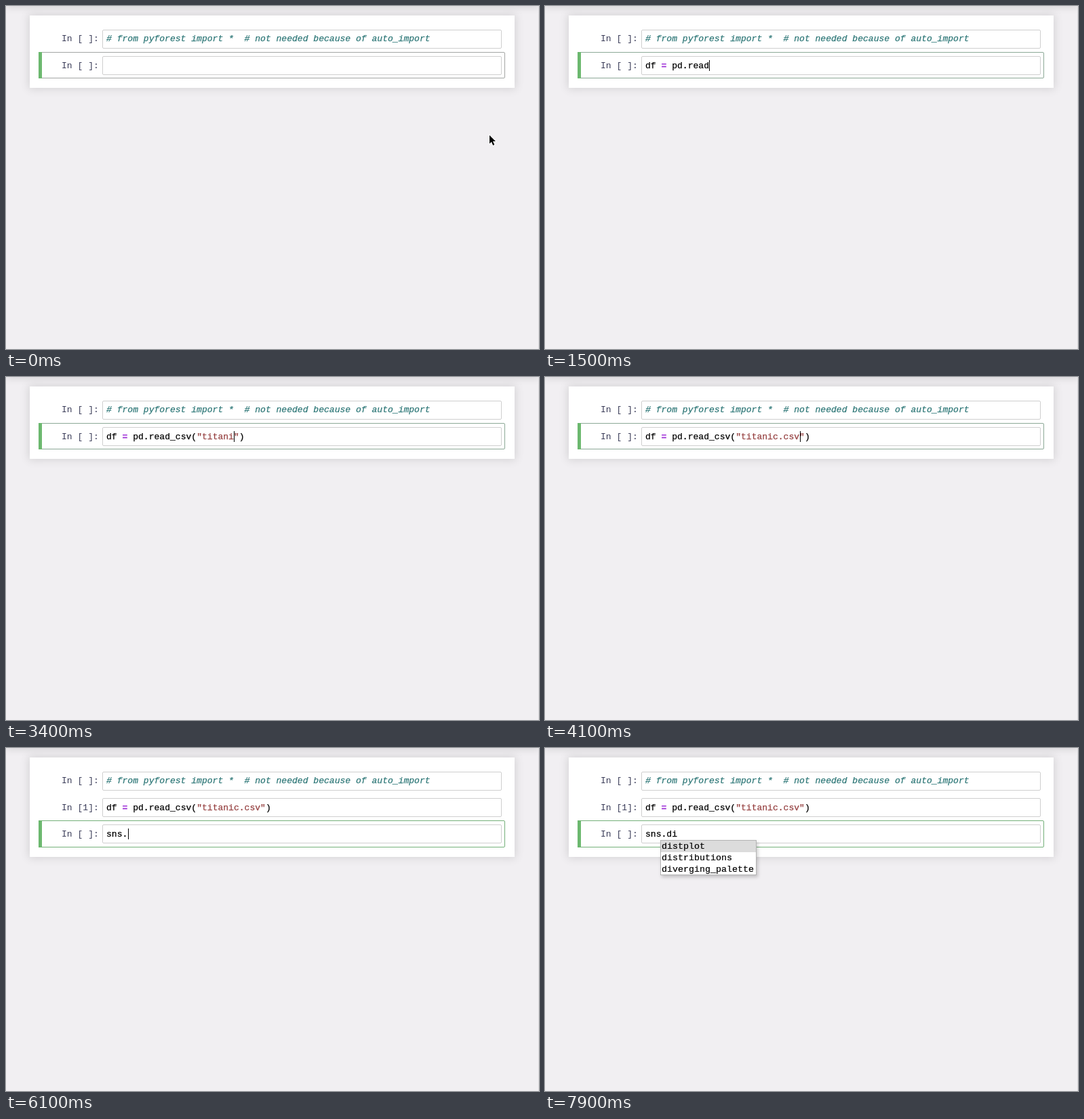
These frames come from a looping animation (786x507 px, 8000 ms). An HTML page:

```html
<!DOCTYPE html>
<html lang="en">
<head>
<meta charset="utf-8">
<title>Notebook typing</title>
<style>
  html, body { margin: 0; width: 100%; height: 100%; overflow: hidden; }
  body { position: relative; background: #f1eff2; font: 13.05px/29px "Liberation Mono", "Courier New", monospace; }
  body * { position: absolute; box-sizing: border-box; white-space: pre; }
  #header { left: 0; top: -10px; width: 100%; height: 10px; }
  #edge { right: 0; top: 0; width: 1px; height: 100%; background: #dddbde; }
  #page { left: 35px; top: 14px; width: 715px; background: #fff; }
  #header, #page { box-shadow: 0 0 12px 1px rgba(87, 87, 87, .2); }
  #active { left: 48px; width: 688px; height: 39.3px; border: 1px solid; border-radius: 2px; }
  #active::before { content: ""; position: absolute; left: -1px; top: -1px; bottom: -1px; width: 5px; background: #6cb86f; }
  .cell { left: 0; width: 731px; height: 28.3px; }
  .label, .code { top: -.2px; }
  .label { left: 82px; color: #3a3c58; }
  .input { left: 142px; width: 589px; height: 28.3px; border: 1px solid #cfcfcf; border-radius: 2px; }
  .code { left: 148px; color: #000; -webkit-text-stroke: .25px; }
  .code * { position: static; }
  .comment { color: #2f7878; font-style: italic; }
  .op { color: #a035d8; font-weight: bold; }
  .str { color: #964242; }
  #caret { width: 1px; height: 16px; background: #000; }
  #popup { left: 170px; top: 136px; width: 142px; height: 52px; border: 1px solid #b4b4b4; background: #fff;
    box-shadow: 2px 3px 5px rgba(0, 0, 0, .2); font-size: 13.33px; line-height: 17px; -webkit-text-stroke: .2px; }
  #popup div { left: 0; width: 140px; height: 17px; padding-left: 1px; }
  #popup div:first-child { background: #dcdcdc; }
  #mouse { left: 711px; top: 189px; }
</style>
</head>
<body>
<div id="header"></div>
<div id="edge"></div>
<div id="page"></div>
<div id="active"></div>
<div id="caret"></div>
<div id="popup"></div>
<svg id="mouse" width="14" height="20"><path d="M2 2V14.5L4.9 11.8L7.2 17L9.3 16.1L7 11H11Z" fill="#000" stroke="#fff" stroke-width="1.6" paint-order="stroke"/></svg>
<script>
const LOOP = 8000, PITCH = 7.83, ROW = 39.3;
const RUN = 4600, DONE = 5000, POPUP = 7300;
const $ = id => document.getElementById(id);

function add(parent, cls, text = "") {
  const el = document.createElement("div");
  el.className = cls;
  el.textContent = text;
  return parent.appendChild(el);
}

const cells = [0, 1, 2].map(i => {
  const box = add(document.body, "cell");
  box.style.top = 34.6 + ROW * i + "px";
  add(box, "input");
  return { box, label: add(box, "label", "In [ ]:"), code: add(box, "code") };
});
cells[0].code.textContent = "# from pyforest import *  # not needed because of auto_import";
cells[0].code.classList.add("comment");
["distplot", "distributions", "diverging_palette"].forEach((word, i) => {
  add($("popup"), "", word).style.top = 17 * i + "px";
});
document.body.append($("caret"), $("popup"));

// Key times: even spacing between [time, characters typed] marks.
function keyTimes(marks) {
  const times = [marks[0][0]];
  for (let m = 1; m < marks.length; m++) {
    const [t0, n0] = marks[m - 1], [t1, n1] = marks[m];
    for (let n = n0 + 1; n <= n1; n++) times.push(t0 + (t1 - t0) * (n - n0) / (n1 - n0));
  }
  return times;
}

const lines = [
  { text: 'df = pd.read_csv("titanic.csv', keys: keyTimes([[200, 1], [1410, 12], [2720, 20], [4040, 29]]) },
  { text: "sns.di", keys: keyTimes([[5300, 1], [5950, 4], [6450, 5], [6700, 6]]) }
];

const highlight = s => s.replace(/".*?"|=/g, m => `<span class="${m === "=" ? "op" : "str"}">${m}</span>`);
const show = (el, on) => { el.style.display = on ? "block" : "none"; };

function setCode(el, typed) {
  // The editor closes quotes and brackets by itself.
  const closing = (typed.includes('"') ? '"' : "") + (typed.includes("(") ? ")" : "");
  const html = highlight(typed + closing);
  if (el.dataset.html !== html) el.innerHTML = el.dataset.html = html;
}

function draw(t) {
  const ran = t >= RUN, row = ran ? 2 : 1;
  const typed = lines.map(({ text, keys }) => text.slice(0, keys.filter(k => k <= t).length));
  typed.forEach((s, i) => setCode(cells[i + 1].code, s));
  cells[1].label.textContent = `In [${!ran ? " " : t < DONE ? "*" : "1"}]:`;
  show(cells[2].box, ran);

  $("page").style.height = 68 + ROW * row + "px";
  $("active").style.top = 28.8 + ROW * row + "px";
  $("active").style.borderColor = ran ? "#74b079" : t < lines[0].keys[0] ? "#a3a6a4" : "#8ca896";

  const last = Math.max(ran ? RUN : 0, ...lines[row - 1].keys.filter(k => k <= t));
  show($("caret"), t >= lines[0].keys[0] && t < POPUP && (t - last) % 1060 < 530);
  $("caret").style.left = 148.5 + typed[row - 1].length * PITCH + "px";
  $("caret").style.top = 40.6 + ROW * row + "px";

  show($("popup"), t >= POPUP);
  show($("mouse"), t < lines[0].keys[0]);
}

const start = performance.now();
function tick() {
  draw((performance.now() - start) % LOOP);
  requestAnimationFrame(tick);
}
tick();
</script>
</body>
</html>
```
